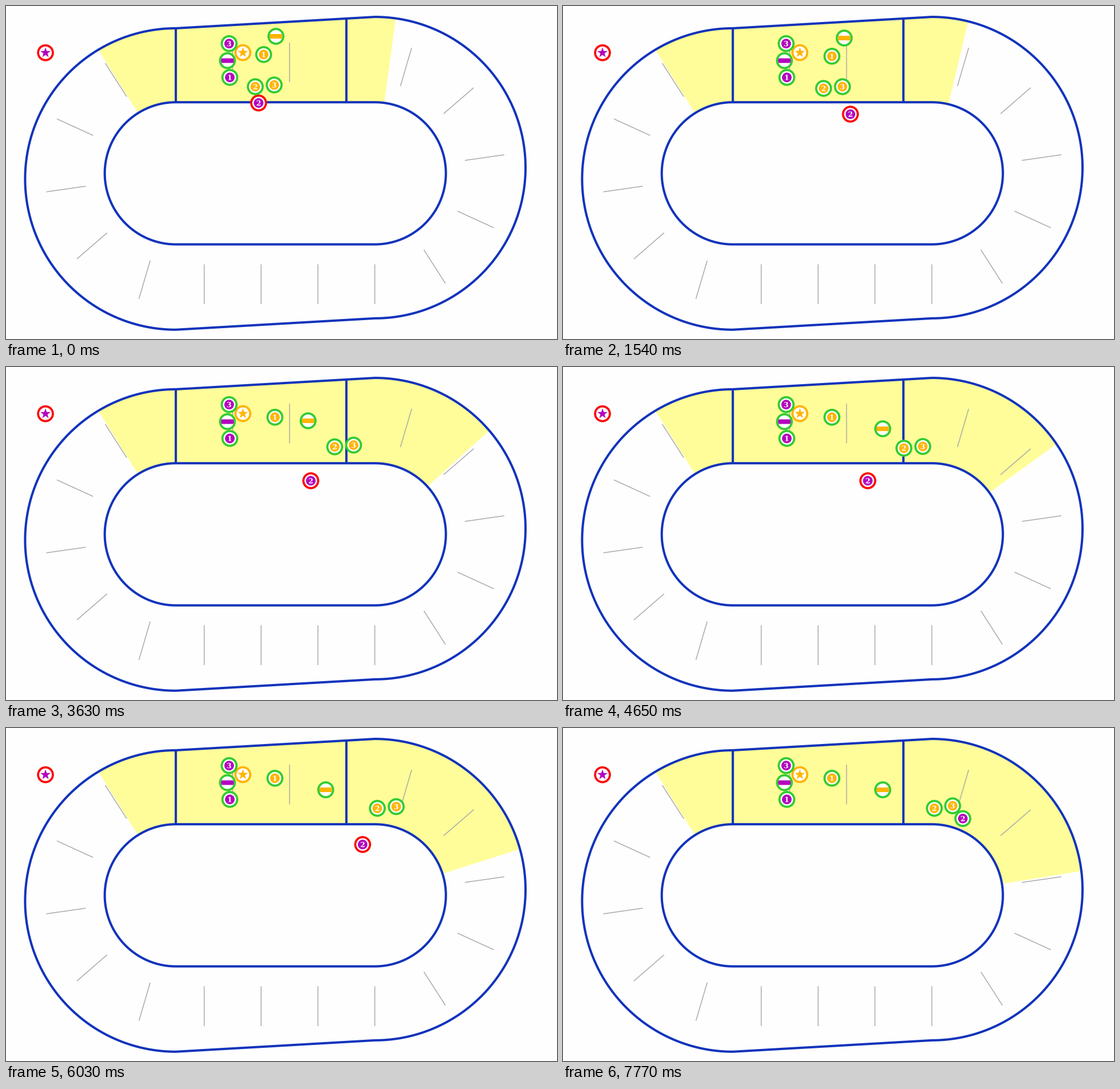
Recreate the animation shown at these times as a matplotlib script. Size 963 by 582 pixels, loop 8000 ms.

```python
import numpy as np
import matplotlib.pyplot as plt
from matplotlib.animation import FuncAnimation
from matplotlib.patches import Circle, PathPatch, Polygon
from matplotlib.textpath import TextPath
from matplotlib.transforms import Affine2D

plt.rcParams["path.snap"] = False

W, H, DPI = 963, 582, 100
STEP, LOOP = 40, 8000
BEAT, LEAD = 195, 105  # the picture changes once per beat

BLUE, GREY, YELLOW = "#1133bb", "#aaaaaa", "#fffd99"
PURPLE, ORANGE = "#b400be", "#ffb400"
GREEN, RED = "#33cc33", "#fb0a0a"

# Track geometry, metres scaled to pixels
M = 32.6
R_IN, R_OUT, SHIFT = 3.81 * M, 8.08 * M, 0.305 * M
GAP, ZONE = 3.048 * M, 6.096 * M
XL, CY = 296.8, 292.4
XR = XL + 3.5 * GAP
R_MID = (R_IN + R_OUT) / 2
R_TICK = R_IN + GAP / 2
HALF_TICK = (R_OUT - R_IN) / 4

fig = plt.figure(figsize=(W / DPI, H / DPI), dpi=DPI, facecolor="#fefefe")
ax = fig.add_axes([0, 0, 1, 1])
ax.set_xlim(0, W)
ax.set_ylim(H, 0)
ax.axis("off")


def px(width):
    return width * 72 / DPI


def ray(cx, a, r, cy=CY):
    """Point at radius r; angles run clockwise from straight up."""
    return cx + r * np.sin(a), cy - r * np.cos(a)


def outline(r, shift):
    a = np.linspace(0, np.pi, 120)
    right = np.column_stack(ray(XR, a, r, CY - shift))
    left = np.column_stack(ray(XL, a + np.pi, r, CY + shift))
    return np.vstack([right, left])


def line(p, q, color, width, z):
    ax.plot([p[0], q[0]], [p[1], q[1]], color=color, lw=px(width),
            solid_capstyle="butt", zorder=z)


def tick(cx, a):
    line(ray(cx, a, R_MID - HALF_TICK), ray(cx, a, R_MID + HALF_TICK),
         GREY, 1.5, 2)


def draw_track():
    for r, shift in ((R_IN, 0), (R_OUT, SHIFT)):
        ax.add_patch(Polygon(outline(r, shift), fill=False, ec=BLUE,
                             lw=px(4), zorder=3))
    for x in (XL, XL + 3 * GAP):
        top = CY - R_OUT + SHIFT - 2 * SHIFT * (x - XL) / (XR - XL)
        line((x, top), (x, CY - R_IN), BLUE, 4, 3)

    for k in (1, 2):
        tick(XL + k * GAP, 0)
    for k in range(4):
        tick(XR - k * GAP, np.pi)
    for k in range(5):
        a = (k + 0.5) * GAP / R_TICK
        tick(XR, a)
        tick(XL, a + np.pi)


def star(r):
    k = np.arange(10)
    return np.column_stack(ray(0, k * np.pi / 5, np.where(k % 2, 0.4, 1) * r,
                               0))


def bar(r, half):
    """Horizontal band of a disc."""
    a = np.linspace(-1, 1, 9) * np.arcsin(half / r)
    end = np.column_stack([r * np.cos(a), r * np.sin(a)])
    return np.vstack([end, -end])


class Token:
    """A round skater marker that is dragged about."""

    def __init__(self, kind, color, ring, x, y):
        self.start = np.array([x, y])
        self.drags = []
        self.shift = Affine2D()
        self.ring = self.add(Circle((0, 0), 14.8, fc=ring))
        self.add(Circle((0, 0), 11, fc="white"))
        if kind == "star":
            self.add(Polygon(star(9.4), fc=color))
        elif kind == "bar":
            self.add(Polygon(bar(11, 4), fc=color))
        else:
            self.add(Circle((0, 0), 8.4, fc=color))
            glyph = TextPath((0, 0), kind, size=12.3,
                             prop=dict(family="DejaVu Serif", weight="bold"))
            box = glyph.get_extents()
            mid = Affine2D().translate(-(box.x0 + box.x1) / 2,
                                       -(box.y0 + box.y1) / 2).scale(1, -1)
            self.add(PathPatch(mid.transform_path(glyph), fc="white"))
        self.move(0)

    def add(self, patch):
        ax.add_patch(patch)
        patch.set(transform=self.shift + ax.transData, lw=0, zorder=5)
        return patch

    def move(self, beat):
        pos = self.start.copy()
        for begin, end, dx, dy in self.drags:
            pos += np.clip((beat - begin) / (end - begin), 0, 1) * np.array(
                [dx, dy])
        self.x, self.y = pos
        self.shift.clear().translate(*pos)

    def place(self):
        """Distance along the track."""
        if self.x <= XR:
            return self.x
        return XR + R_MID * np.arctan2(self.x - XR, CY - self.y)

    def in_bounds(self):
        return np.hypot(max(self.x - XR, 0), CY - self.y) > R_IN + 13


def drag(tokens, begin, end, dx, dy):
    for token in tokens:
        token.drags.append((begin, end, dx, dy))


draw_track()
zone = ax.add_patch(Polygon([(0, 0), (1, 1), (1, 0)], fc=YELLOW, lw=0,
                            zorder=1))

Token("star", PURPLE, RED, 69, 81.7)
Token("star", ORANGE, ORANGE, 414, 81.5)
wall = [Token("3", PURPLE, GREEN, 390, 65.7),
        Token("bar", PURPLE, GREEN, 387, 95.5),
        Token("1", PURPLE, GREEN, 391.2, 124.8)]
runner = Token("2", PURPLE, RED, 441.5, 169.5)
pivot = Token("bar", ORANGE, GREEN, 471.8, 53)
one = Token("1", ORANGE, GREEN, 450.3, 84.8)
pair = [Token("2", ORANGE, GREEN, 435.7, 141),
        Token("3", ORANGE, GREEN, 468.7, 138)]
orange = [pivot, one] + pair
pack = wall + orange

drag(orange, 0, 4, 19.7, 3)
drag([runner], 4, 10, 91.2, 29.3)
drag(pair, 10, 12, 61.3, -1.5)
drag(pair, 12, 15, 57.8, -3)
drag([pivot], 17, 19, 36.5, 38)
drag([pivot], 19, 21, 30.8, 14)
drag(pair, 21, 24, 21.3, 2.4)
drag(pair, 24, 27, 53.2, -1.5)
drag([runner], 27, 30, 57.3, 9.2)
drag([runner], 30, 31, 33.3, -4.4)
drag([runner], 31, 36, 60.7, -22.6)
drag([runner], 36, 40, 14.8, -22.7)
drag(pair[1:], 39, 40, -1, -1.4)


def edge(cx, a, shift):
    """Where a ray from a bend's centre meets the outer line."""
    b = shift * np.cos(a)
    return ray(cx, a, b + np.sqrt(b * b + R_OUT ** 2 - shift ** 2))


def zone_shape(rear, front):
    back = (rear - ZONE - XL) / R_MID
    ahead = max((front + ZONE - XR) / R_MID, 0)
    left, right = np.linspace(back, 0, 40), np.linspace(0, ahead, 60)
    outer = [edge(XL, a, -SHIFT) for a in left]
    outer += [edge(XR, a, SHIFT) for a in right]
    inner = [ray(XL, a, R_IN) for a in left]
    inner += [ray(XR, a, R_IN) for a in right]
    return outer + inner[::-1]


def update(n):
    now = n * STEP + STEP * 3 // 4
    beat = (now - LEAD) // BEAT + 1
    for token in pack + [runner]:
        token.move(beat)
    legal = runner.in_bounds()
    runner.ring.set_facecolor(GREEN if legal else RED)
    places = [p.place() for p in pack + [runner] * legal]
    zone.set_xy(zone_shape(min(places), max(places)))
    return []


anim = FuncAnimation(fig, update, frames=LOOP // STEP, interval=STEP,
                     repeat=True, repeat_delay=0, blit=False)
plt.show()
```
